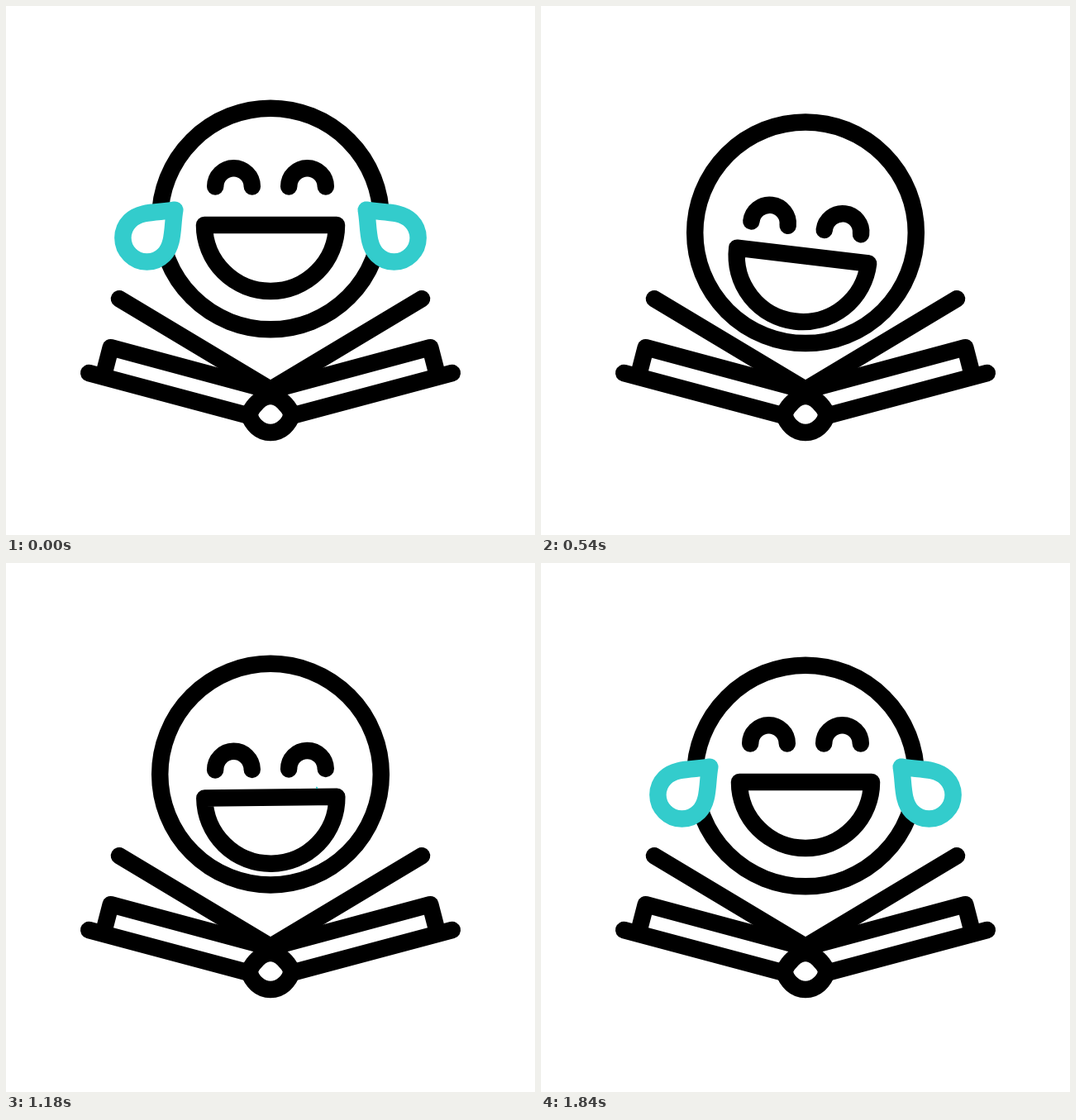
An HTML page with a canvas for the animation above (2400 ms loop, 640 by 640 pixels).

```html
<!DOCTYPE html>
<html lang="en">
<head>
<meta charset="utf-8">
<title>Laughing reader</title>
<style>
html, body { margin: 0; width: 100%; height: 100%; overflow: hidden; background: #fff; }
canvas { display: block; width: 100vw; height: 100vh; }
</style>
</head>
<body>
<canvas id="stage" width="640" height="640"></canvas>
<script>
const ctx = document.getElementById('stage').getContext('2d');
const LOOP = 2400, STEP = 20, LAST = 92;
const INK = '#000', TEAR = '#33cccc', PAPER = '#fff', WIDTH = 20.5;
const CX = 320, HINGE = 464, PAGE = 213.6;

// Keys are [time in steps, value]
const headKeys = [[0, 257.5], [15.25, 224], [29, 277], [41.3, 224], [54.1, 277], [65.3, 224], [77.8, 277], [92, 257.5]];
const tiltKeys = [[0, 0], [10, -19], [19, 32], [30.5, 0], [44, -18.5], [61, 0], [70, -18.5], [79, 32], [91, 0]];
const dropKeys = [[0, 0], [12, 1], [76, 1], [92, 0]];
const flips = [5.2, 64.8], FLIP = 20;

const ease = x => (1 - Math.cos(Math.PI * x)) / 2;
const mix = (a, b, x) => a + (b - a) * x;
const rad = deg => deg * Math.PI / 180;

function track(keys, f) {
  for (let i = 1; i < keys.length; i++) {
    const [t0, a] = keys[i - 1], [t1, b] = keys[i];
    if (f <= t1) return mix(a, b, ease((f - t0) / (t1 - t0)));
  }
  return keys[keys.length - 1][1];
}

function stroke(draw, color = INK, width = WIDTH) {
  ctx.strokeStyle = color;
  ctx.lineWidth = width;
  ctx.beginPath();
  draw();
  ctx.stroke();
}

function line(...pts) {
  stroke(() => pts.forEach(([x, y]) => ctx.lineTo(x, y)));
}

function drawBook() {
  for (const side of [-1, 1]) {
    const p = (x, y) => [CX + side * x, y];
    line(p(183, 354.3), p(0, HINGE));
    line(p(201, 443), p(193.3, 413.2), p(0, HINGE + 1.2));
    line(p(219.8, 444), p(25, 496));
  }
  stroke(() => {
    ctx.moveTo(293.7, 494);
    ctx.bezierCurveTo(299, 483, 309, 472, 320, 472);
    ctx.bezierCurveTo(331, 472, 341, 483, 346.3, 494);
    ctx.bezierCurveTo(342.5, 506, 333, 516, 320, 516);
    ctx.bezierCurveTo(307, 516, 297.5, 506, 293.7, 494);
    ctx.closePath();
  });
}

function drawPage(x) {
  const a = rad(mix(31, 149, ease(x)));
  const dx = Math.cos(a) * PAGE, dy = -Math.sin(a) * PAGE;
  const along = 0.66, bend = 0.13 * Math.sin(Math.PI * x);
  stroke(() => {
    ctx.moveTo(CX, HINGE);
    ctx.quadraticCurveTo(
      CX + dx * along - dy * bend, HINGE + dy * along + dx * bend,
      CX + dx, HINGE + dy);
  });
}

function drawHead(y, tilt, drop) {
  ctx.save();
  ctx.translate(CX, y);
  stroke(() => ctx.arc(0, 0, 133.8, 0, 2 * Math.PI));
  ctx.rotate(rad(tilt));
  const mouth = 7.5 + 20.5 * drop, eyes = -39 + 33 * drop;
  stroke(() => {
    ctx.arc(0, mouth, 80, 0, Math.PI);
    ctx.closePath();
  });
  for (const x of [-44.5, 44.5]) {
    stroke(() => ctx.arc(x, eyes, 22.3, Math.PI, 2 * Math.PI));
  }
  ctx.restore();
}

function drawTear(x, y, angle, size, width = WIDTH) {
  const r = 29 * size, len = 47.8 * size, k = 0.56 * r;
  ctx.save();
  ctx.translate(x, y);
  ctx.rotate(rad(angle));
  ctx.fillStyle = PAPER;
  stroke(() => {
    ctx.moveTo(0, -len);
    ctx.bezierCurveTo(11 * size, -len + 16 * size, r, -0.62 * r, r, 0);
    ctx.bezierCurveTo(r, k, k, r, 0, r);
    ctx.bezierCurveTo(-k, r, -r, k, -r, 0);
    ctx.bezierCurveTo(-r, -0.62 * r, -11 * size, -len + 16 * size, 0, -len);
    ctx.closePath();
    ctx.fill();
  }, TEAR, width);
  ctx.restore();
}

function fallingTear(side, f) {
  const x = f / 18;
  const drift = side < 0 ? -3.5 : 26.5, depth = side < 0 ? 304 : 311.5;
  drawTear(CX + side * 149.5 + drift * x, 280.5 + depth * x * x,
    -side * mix(45, 13, x), mix(1, 0.95, x));
}

function growingTear(side, f, y, tilt) {
  const start = 60 - side * 1.2;
  if (f <= start) return;
  const e = Math.pow((f - start) / (LAST - start), 0.75);
  const a = rad(tilt * 0.6), dx = side * (54 + 93 * e), dy = 16.5 + 4 * e;
  drawTear(
    CX + dx * Math.cos(a) - dy * Math.sin(a) + side * 2.5 * e,
    y + dx * Math.sin(a) + dy * Math.cos(a) + 2.5 * e,
    -side * 45, e, WIDTH * Math.min(1, (f - start) / 4));
}

function draw(f) {
  const y = track(headKeys, f), tilt = track(tiltKeys, f);
  ctx.fillStyle = PAPER;
  ctx.fillRect(0, 0, 640, 640);
  drawHead(y, tilt, track(dropKeys, f));
  drawBook();
  for (const start of flips) {
    const x = (f - start) / FLIP;
    if (x > 0 && x < 1) drawPage(x);
  }
  for (const side of [-1, 1]) {
    if (f < 26) fallingTear(side, f);
    else growingTear(side, f, y, tilt);
  }
}

ctx.lineCap = ctx.lineJoin = 'round';
const begin = performance.now();

function tick() {
  const t = Math.max(0, performance.now() - begin) % LOOP;
  draw(Math.min(LAST, Math.floor(t / STEP)));
  requestAnimationFrame(tick);
}
tick();
</script>
</body>
</html>
```
